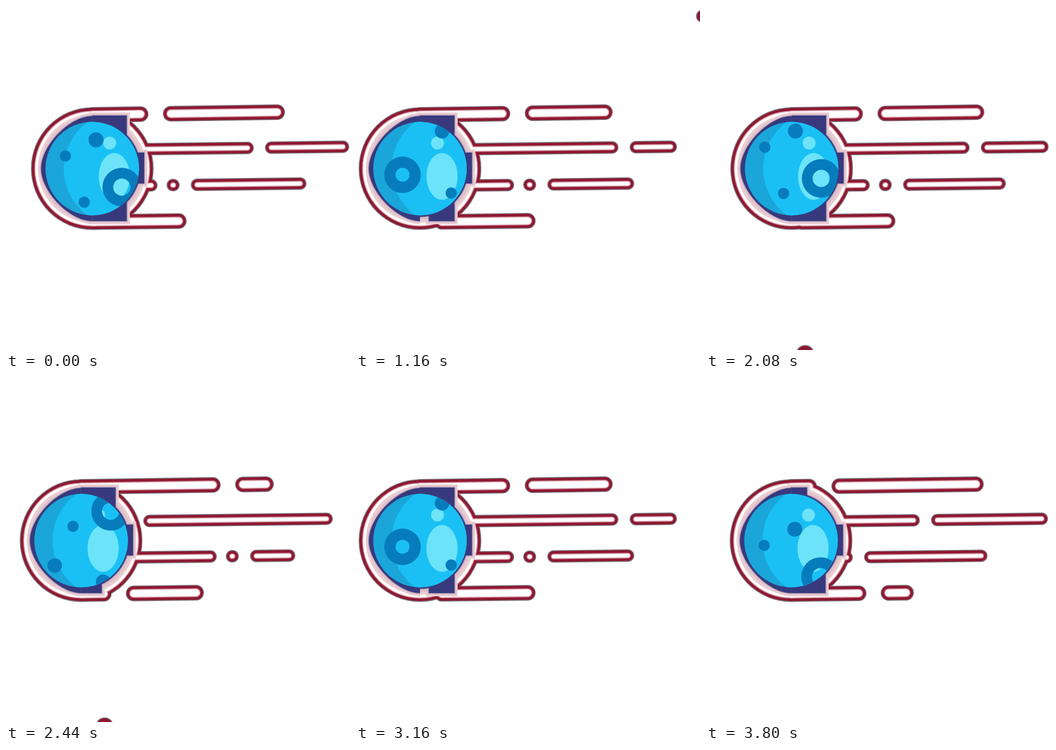
These frames come from a looping animation (640x640 px, 3840 ms). An HTML page with a canvas:

```html
<!DOCTYPE html>
<html lang="en">
<head>
<meta charset="utf-8">
<title>Comet planet</title>
<style>
  html, body { margin: 0; width: 100%; height: 100%; overflow: hidden; background: #fff; }
  canvas { display: block; width: 640px; height: 640px; }
</style>
</head>
<body>
<canvas id="stage" width="640" height="640"></canvas>
<script>
const ctx = document.getElementById('stage').getContext('2d');
const TAU = Math.PI * 2;
const LOOP = 3840, TICK = 40, CYCLE = 49;
const CY = 302.5, BODY_R = 113.5, PLANET_R = 87, SCROLL = 397;

// Streaks trail to the right of the planet; x is measured from its centre.
// gaps: [offset, width] pairs that travel "period" px every half cycle.
const streaks = [
  { y: 202.5, slope: 0.0145, half: 14, end: 358, start: 104, period: 345.5, gaps: [[0, 28]] },
  { y: 267.5, slope: 0.012, half: 11, end: 477.5, start: 300, period: 373.5, gaps: [[0, 22]] },
  { y: 335, slope: 0.012, half: 11, end: 398, start: 121, period: 291.5, gaps: [[0, 18], [41, 22]] },
  { y: 402, slope: 0.012, half: 14, end: 228, start: 175, period: 215.5, gaps: [[0, 27.5]] }
];

// Nested layers as [inset, colour], from the dark fringe to the white core.
const outline = [
  [-0.6, '#7d777f'], [1, '#8e1730'], [5.4, '#b2566a'], [6.4, '#d9a3ac'], [7.4, '#f5e6e8'], [8.4, '#fff']
];
// Navy shape with its pink halo as [growth, radius of the round part, colour].
const innerRim = [
  [6, 101, '#e9ced3'], [3, 96, '#e0c0c9'], [1.2, 91, '#9288ad'], [0, 89.5, '#38397d']
];

const craters = [
  { x: 7, y: 0, r: 14 }, { x: -50, y: 30, r: 10.5 },
  { x: 55, y: 88, r: 36, hole: 16 }, { x: -15, y: 116, r: 10.5 },
  { x: -49, y: 189, r: 13.5 }, { x: 41, y: 219, r: 13.5 },
  { x: -32.5, y: 300, r: 34, hole: 13 }, { x: 58, y: 334, r: 10.5 }
];

function disc(x, y, r, color) {
  ctx.fillStyle = color;
  ctx.beginPath();
  ctx.arc(x, y, r, 0, TAU);
  ctx.fill();
}

function dashes(streak, step) {
  const shift = (streak.start + streak.period * step * 2 / CYCLE) % streak.period;
  const list = [];
  let from = -streak.half;
  const add = to => {
    if (to - from > 2 * streak.half - 1) list.push([from, to]);
  };
  for (let k = -1; k <= 1; k++) {
    for (const [offset, width] of streak.gaps) {
      const a = shift + k * streak.period + offset;
      add(Math.min(a, streak.end));
      from = Math.max(from, a + width);
    }
  }
  add(streak.end);
  return list;
}

function drawDash(cx, streak, [a, b], inset) {
  const half = Math.min(streak.half, (b - a) / 2);
  const x1 = a + half, x2 = Math.max(b - half, x1 + 0.05);
  ctx.lineWidth = 2 * (half - inset);
  ctx.beginPath();
  ctx.moveTo(cx + x1, streak.y - streak.slope * x1);
  ctx.lineTo(cx + x2, streak.y - streak.slope * x2);
  ctx.stroke();
}

function drawOutline(cx, runs) {
  ctx.lineCap = 'round';
  for (const [inset, color] of outline) {
    disc(cx, CY, BODY_R - inset, color);
    ctx.strokeStyle = color;
    streaks.forEach((s, i) => runs[i].forEach(run => drawDash(cx, s, run, inset)));
  }
}

// Left half of the navy shape: an arch that comes to a blunt point.
function drawNose(cx, grow) {
  const w = 95 + grow, h = 97.5 + grow, bend = 0.44;
  ctx.beginPath();
  ctx.moveTo(cx, CY - h);
  ctx.bezierCurveTo(cx - w * bend, CY - h, cx - w, CY - h * bend, cx - w, CY);
  ctx.bezierCurveTo(cx - w, CY + h * bend, cx - w * bend, CY + h, cx, CY + h);
  ctx.fill();
}

function drawInnerRim(cx, runs) {
  const corners = [[runs[0], 204], [runs[3], CY]];
  for (const [grow, radius, color] of innerRim) {
    disc(cx, CY, radius, color);
    drawNose(cx, grow);
    const box = (x1, x2, y, h) =>
      ctx.fillRect(cx + x1 - grow, y - grow, x2 - x1 + 2 * grow, h + 2 * grow);
    box(70, 96.5, 273, 57);
    for (const [list, top] of corners) {
      for (const [a, b] of list) {
        const left = Math.max(0, a - 10), right = Math.min(64, b - 18);
        if (right > left) box(left, right, top, 97.5);
      }
    }
  }
}

function drawPlanet(cx, step) {
  ctx.save();
  ctx.beginPath();
  ctx.arc(cx, CY, PLANET_R, 0, TAU);
  ctx.clip();
  disc(cx, CY, PLANET_R + 1, '#1ba6d9');
  disc(cx + 54, CY, 107, '#1ac0f4');
  ctx.fillStyle = '#6ce3f9';
  ctx.beginPath();
  ctx.ellipse(cx + 41, 317, 29, 43.5, 0, 0, TAU);
  ctx.fill();
  disc(cx + 32.5, 255, 12, '#6ce3f9');

  ctx.fillStyle = '#077cbc';
  for (const c of craters) {
    const travel = 249 + c.y - SCROLL * step / CYCLE - 160;
    const y = 160 + ((travel % SCROLL) + SCROLL) % SCROLL;
    ctx.beginPath();
    ctx.arc(cx + c.x, y, c.r, 0, TAU);
    if (c.hole) ctx.arc(cx + c.x, y, c.hole, 0, TAU);
    ctx.fill('evenodd');
  }
  ctx.restore();
}

// Small round bodies that peek over the stage edge and sink back.
function peek(t, peak, depth) {
  return depth * (1 - ((t - peak) / 830) ** 2);
}

function spot(x, y, r) {
  disc(x, y, r, outline[0][1]);
  disc(x, y, r - 1.6, outline[1][1]);
}

function draw(t) {
  const tick = Math.floor(t / TICK);
  // A short hitch: the motion rests for two ticks and resumes one tick behind.
  const step = tick <= 40 ? tick : tick < 43 ? 40 : tick - 1;
  const time = step * TICK + (tick > 42 ? TICK : 0);
  const cx = 137.5 + 23 * Math.cos(TAU * (step + 0.5) / CYCLE);
  const runs = streaks.map(s => dashes(s, step));

  ctx.fillStyle = '#fff';
  ctx.fillRect(0, 0, 640, 640);
  const side = peek(time, 1240, 7.5), low = peek(time, 2180, 9.5);
  if (side > 0) spot(640 - side + 12, 19, 12);
  if (low > 0) spot(184.5 - (time - 2080) / 380, 640 - low + 17, 17);
  drawOutline(cx, runs);
  drawInnerRim(cx, runs);
  drawPlanet(cx, step);
}

const begin = performance.now();
function frame() {
  draw((performance.now() - begin) % LOOP);
  requestAnimationFrame(frame);
}
frame();
</script>
</body>
</html>
```
